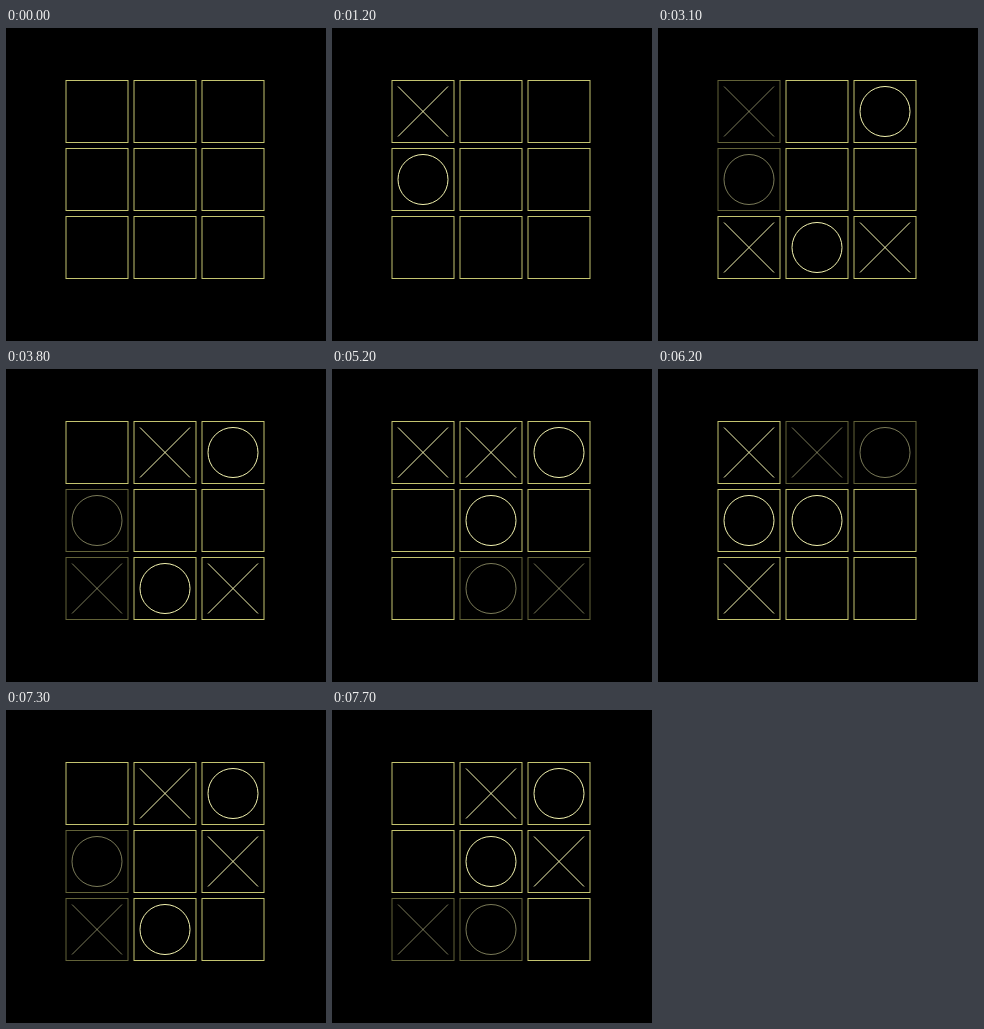
An HTML page with a canvas that plays this animation: 320 by 313 pixels, repeating every 8 s.

```html
<!DOCTYPE html>
<html lang="en">
<head>
<meta charset="utf-8">
<title>Endless tic-tac-toe</title>
<style>
  html, body { margin: 0; width: 100%; height: 100%; overflow: hidden; background: #000; }
  canvas { display: block; }
</style>
</head>
<body>
<canvas id="board" width="320" height="313"></canvas>
<script>
const ctx = document.getElementById('board').getContext('2d');
const LOOP = 8000, SIZE = 62, PITCH = 68, LEFT = 60, TOP = 52.5, R = 25;

// Cells each player visits in turn, and the pause before each move in tenths of a second
const PATHS = { X: '06810651', O: '3724' };
const PAUSES = '8444477866423334';

let clock = 0;
const moves = [...PAUSES].map((pause, i) => {
  const player = i % 2 ? 'O' : 'X';
  const path = PATHS[player];
  clock += pause * 100;
  return { player, at: clock, cell: +path[(i >> 1) % path.length] };
});

// Each player keeps three marks; the one that goes next is dimmed
function boardAt(time) {
  const cells = Array(9).fill(null);
  for (const player in PATHS) {
    const marks = moves.filter(m => m.player === player && m.at <= time).slice(-3);
    marks.forEach(({ cell }, i) => {
      cells[cell] = { player, dim: marks.length === 3 && i === 0 };
    });
  }
  return cells;
}

function drawCell(mark, index) {
  const x = LEFT + index % 3 * PITCH;
  const y = TOP + Math.floor(index / 3) * PITCH;
  const cx = x + SIZE / 2, cy = y + SIZE / 2;

  ctx.globalAlpha = mark && mark.dim ? 0.5 : 1;
  ctx.strokeStyle = '#c4c470';
  ctx.strokeRect(x, y, SIZE, SIZE);
  if (!mark) return;

  ctx.strokeStyle = '#f4f4b0';
  ctx.beginPath();
  if (mark.player === 'X') {
    for (const side of [-R, R]) {
      ctx.moveTo(cx + side, cy - R);
      ctx.lineTo(cx - side, cy + R);
    }
  } else {
    ctx.arc(cx, cy, R, 0, Math.PI * 2);
  }
  ctx.stroke();
}

const start = performance.now();

function draw() {
  ctx.globalAlpha = 1;
  ctx.fillStyle = '#000';
  ctx.fillRect(0, 0, 320, 313);
  boardAt((performance.now() - start) % LOOP).forEach(drawCell);
  requestAnimationFrame(draw);
}
draw();
</script>
</body>
</html>
```
